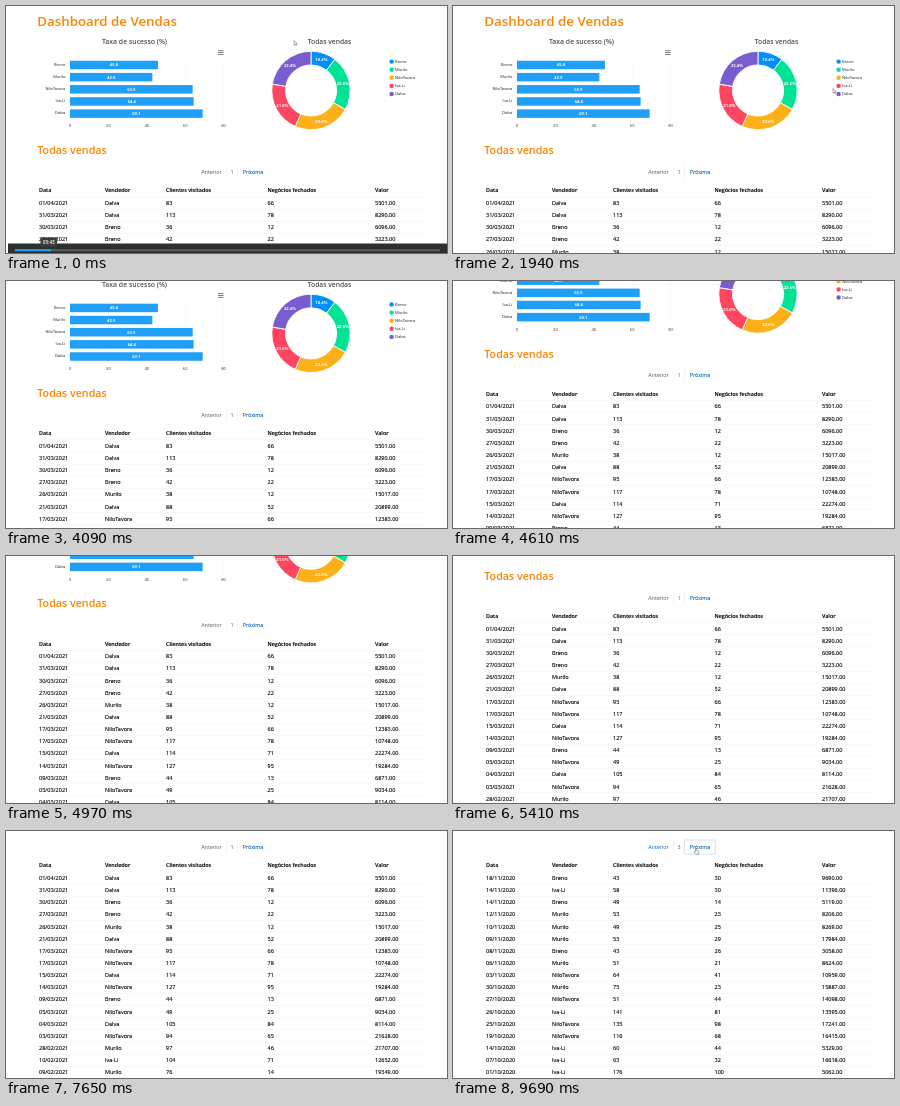
Animation, 441 px wide and 247 px high, one loop 9790 ms. Source, as an HTML page:

```html
<!DOCTYPE html>
<html lang="pt">
<head>
<meta charset="utf-8">
<title>Dashboard de Vendas</title>
<style>
html, body { margin: 0; width: 100%; height: 100%; overflow: hidden; background: #fff; }
svg { display: block; width: 100vw; height: 100vh; font-family: "Open Sans", "Noto Sans", sans-serif; }
</style>
</head>
<body>
<svg id="stage" viewBox="0 0 441 247"></svg>
<script>
const LOOP = 9790;
const INK = '#000', GREY = '#50575e', BLUE = '#0068b8', ORANGE = '#fb8500', RULE = '#eceef0';
const ROW_STEP = 12.15;
const COLUMNS = [33, 99, 160, 261.5, 369];

const sellers = [
  { name: 'Breno', rate: 45.8, share: 10.4, color: '#008ffb' },
  { name: 'Murilo', rate: 42.9, share: 22.6, color: '#00e396' },
  { name: 'NiloTavora', rate: 63.9, share: 23.6, color: '#feb019' },
  { name: 'Iva-Li', rate: 64.4, share: 21.0, color: '#ff4560' },
  { name: 'Dalva', rate: 69.1, share: 22.4, color: '#775dd0' }
];

// Each row: date, seller index, visits, deals, value
const firstPage = `01/04 4 83 66 5501
31/03 4 113 78 8290
30/03 0 36 12 6096
27/03 0 42 22 3223
26/03 1 38 12 15017
21/03 4 88 52 20899
17/03 2 95 66 12383
17/03 2 117 78 10748
15/03 4 114 71 22274
14/03 2 127 95 19284
09/03 0 44 13 6871
05/03 2 49 25 9034
04/03 4 105 84 8114
03/03 2 94 65 21628
28/02 1 97 46 21707
10/02 3 104 71 12652
09/02 1 76 14 19349`;

const thirdPage = `18/11 0 43 30 9690
14/11 3 58 30 11396
14/11 0 49 14 5119
12/11 1 53 23 8206
10/11 1 49 25 8269
09/11 1 53 29 17984
08/11 0 43 26 3058
06/11 1 51 21 8624
03/11 2 64 41 10959
30/10 1 75 23 15887
27/10 2 51 44 14098
26/10 3 141 81 13595
25/10 2 135 98 17241
19/10 2 116 68 16415
14/10 3 60 44 5329
07/10 3 63 32 16618
01/10 3 176 100 5062`;

function parsePage(source, year) {
  return source.split('\n').map(line => {
    const [date, seller, visits, deals, value] = line.split(' ');
    return [`${date}/${year}`, sellers[seller].name, visits, deals, `${value}.00`];
  });
}

function randomPage() {
  let seed = 41;
  const random = (low, high) => {
    seed = (seed * 16807) % 2147483647;
    return Math.floor(low + (high - low) * seed / 2147483647);
  };
  return Array.from({ length: 17 }, (_, i) => {
    const day = new Date(2021, 1, 5 - Math.round(i * 4.5));
    const visits = random(36, 140);
    const pad = n => String(n).padStart(2, '0');
    return [
      `${pad(day.getDate())}/${pad(day.getMonth() + 1)}/${day.getFullYear()}`,
      sellers[random(0, 5)].name, visits, Math.round(visits * random(30, 80) / 100),
      `${random(3000, 22000)}.00`
    ];
  });
}

const text = (x, y, size, content, fill = INK, extra = '') =>
  `<text x="${x}" y="${y + size * 0.36}" font-size="${size}" fill="${fill}" ${extra}>${content}</text>`;
const rect = (x, y, w, h, fill, extra = '') =>
  `<rect x="${x}" y="${y}" width="${w}" height="${h}" fill="${fill}" ${extra}/>`;
const MIDDLE = 'text-anchor="middle"', END = 'text-anchor="end"', BOLD = 'font-weight="700"';
const SEMI = 'font-weight="600"';
const FIRM = `stroke="${INK}" stroke-width=".12"`;

function barChart() {
  let out = text(128.5, 36, 6.9, 'Taxa de sucesso (%)', '#4a5157', `${MIDDLE} ${SEMI}`);
  for (let i = 0; i < 3; i++) out += rect(212, 44.4 + i * 1.8, 5.6, 0.75, GREY);
  for (let i = 0; i <= 4; i++) {
    const x = 64 + i * 38.4;
    out += rect(x - 0.15, 53, 0.3, 61.5, RULE) + text(x, 120, 4.1, i * 20, '#30363b', MIDDLE);
  }
  sellers.forEach(({ name, rate }, i) => {
    const y = 59 + i * 12.15, width = rate * 1.92;
    out += rect(64, y - 4.25, width, 8.5, '#1f9ff8')
      + text(59.3, y - 0.6, 4, name, '#1d2224', END)
      + text(64 + width / 2, y, 4.1, rate.toFixed(1), '#fff', `${MIDDLE} ${BOLD}`);
  });
  return out;
}

function donutChart() {
  const cx = 305, cy = 84.5, outer = 39.2, inner = 25.6;
  const at = (percent, r) => {
    const angle = percent / 50 * Math.PI;
    return [cx + r * Math.sin(angle), cy - r * Math.cos(angle)];
  };
  let out = text(323.5, 36, 6.7, 'Todas vendas', '#4a5157', `${MIDDLE} ${SEMI}`);
  let labels = '', start = 0;
  sellers.forEach(({ name, share, color }, i) => {
    const end = start + share;
    out += `<path d="M${at(start, outer)}A${outer} ${outer} 0 0 1 ${at(end, outer)}L${at(end, inner)}`
      + `A${inner} ${inner} 0 0 0 ${at(start, inner)}Z" fill="${color}" stroke="#fff" stroke-width=".9"/>`;
    const [x, y] = at(start + share / 2, 32.5);
    labels += text(x, y, 4.2, share.toFixed(1) + '%', '#fff', `${MIDDLE} ${BOLD}`);
    const legendY = 55.6 + i * 8.1;
    labels += `<circle cx="385.6" cy="${legendY}" r="2.2" fill="${color}"/>`
      + text(389, legendY, 4.1, name, '#1d2224');
    start = end;
  });
  return out + labels;
}

function tableRows(rows) {
  return rows.map((cells, i) => {
    const y = 197 + i * ROW_STEP;
    return rect(31, y + 5.9, 389, 0.4, RULE)
      + cells.map((cell, c) => text(COLUMNS[c], y, 5.5, cell, INK, FIRM)).join('');
  }).join('');
}

function pager(number) {
  return rect(220.3, 159.5, 0.5, 13, '#e3e6e9') + rect(231, 159.5, 0.5, 13, '#e3e6e9')
    + (number > 1 ? rect(231.3, 159, 31, 14.2, '#fff', 'stroke="#c4e0f5" stroke-width=".9" rx="1"') : '')
    + text(205.5, 166, 5.4, 'Anterior', number > 1 ? BLUE : GREY, MIDDLE)
    + text(226, 166, 5.4, number, number > 1 ? GREY : BLUE, MIDDLE)
    + text(247, 166, 5.4, 'Próxima', BLUE, `${MIDDLE} stroke="${BLUE}" stroke-width=".1"`);
}

function playerBar() {
  return rect(2, 237.5, 439, 9.5, '#2d2f31')
    + rect(9, 243.2, 425, 2, '#5c6063') + rect(9, 243.2, 36, 2, '#1ba7ea')
    + rect(34.5, 231.5, 16.5, 9, '#3a3c3e', 'rx="1"')
    + text(42.8, 236, 4.7, '05:43', '#fff', `${MIDDLE} ${SEMI}`);
}

const headings = ['Data', 'Vendedor', 'Clientes visitados', 'Negócios fechados', 'Valor'];
const pages = [parsePage(firstPage, 2021), randomPage(), parsePage(thirdPage, 2020)];

document.getElementById('stage').innerHTML = rect(0, 0, 441, 247, '#fff')
  + '<g id="content">'
  + text(31.3, 15, 13.3, 'Dashboard de Vendas', ORANGE, SEMI)
  + barChart() + donutChart()
  + text(31.3, 144.2, 10.7, 'Todas vendas', ORANGE, SEMI)
  + headings.map((label, c) => text(COLUMNS[c], 184.4, 5.4, label, INK, `${SEMI} ${FIRM}`)).join('')
  + rect(31, 190.8, 389, 0.4, RULE)
  + pages.map((rows, i) => `<g class="page">${pager(i + 1)}${tableRows(rows)}</g>`).join('')
  + '</g>'
  + '<g id="cursor" fill="#fff" stroke="#333" stroke-width=".4">'
  + '<path id="arrow" d="M0 0V4.6L1.1 3.6L1.9 5.2L2.6 4.8L1.8 3.4H3.2Z"/>'
  + '<path id="hand" d="M1.4 3.4V.5Q1.9 -.2 2.4 .5V2.5L4.4 3Q5 3.2 4.9 4L4.4 6.4H1.8L.2 4.2Q.2 3.3 1.4 4Z"/></g>'
  + `<g id="player">${playerBar()}</g>`;

const byId = id => document.getElementById(id);
const content = byId('content'), cursor = byId('cursor'), player = byId('player');
const arrow = byId('arrow'), hand = byId('hand');
const pageGroups = [...document.querySelectorAll('.page')];

const scrollKeys = [[3770, 0], [4090, 32], [4610, 71.4], [5410, 124.3], [5970, 145.5], [6290, 150]];
const clamp01 = v => Math.max(0, Math.min(1, v));
const show = (node, visible) => node.setAttribute('display', visible ? 'inline' : 'none');

// Cubic Hermite curve through the scroll keys
function scrollAt(time) {
  const last = scrollKeys.length - 1;
  if (time <= scrollKeys[0][0]) return 0;
  if (time >= scrollKeys[last][0]) return scrollKeys[last][1];
  const i = scrollKeys.findIndex(key => key[0] > time) - 1;
  const slope = k => {
    if (k === last) return 0;
    const [t0, y0] = scrollKeys[Math.max(0, k - 1)], [t1, y1] = scrollKeys[k + 1];
    return (y1 - y0) / (t1 - t0);
  };
  const [t0, y0] = scrollKeys[i], [t1, y1] = scrollKeys[i + 1];
  const span = t1 - t0, u = (time - t0) / span, v = 1 - u;
  return y0 * v * v * (1 + 2 * u) + y1 * u * u * (3 - 2 * u)
    + span * u * v * (slope(i) * v - slope(i + 1) * u);
}

function cursorAt(time) {
  if (time >= 8130) return [241, 16.8];
  if (time >= 3180) return null;
  const u = clamp01((time - 980) / 900), eased = u * u * (3 - 2 * u);
  return [288 + 92 * eased, 34.5 + 48 * eased];
}

function render(time) {
  content.setAttribute('transform', `translate(0 ${-scrollAt(time)})`);
  player.setAttribute('opacity', 1 - clamp01((time - 980) / 240));
  const page = time < 8490 ? 0 : time < 9290 ? 1 : 2;
  pageGroups.forEach((group, i) => show(group, i === page));
  const point = cursorAt(time);
  show(cursor, point);
  show(arrow, time < 8130);
  show(hand, time >= 8130);
  if (point) cursor.setAttribute('transform', `translate(${point})`);
}

const startTime = performance.now();
function tick() {
  render((performance.now() - startTime) % LOOP);
  requestAnimationFrame(tick);
}
render(0);
requestAnimationFrame(tick);
</script>
</body>
</html>
```
